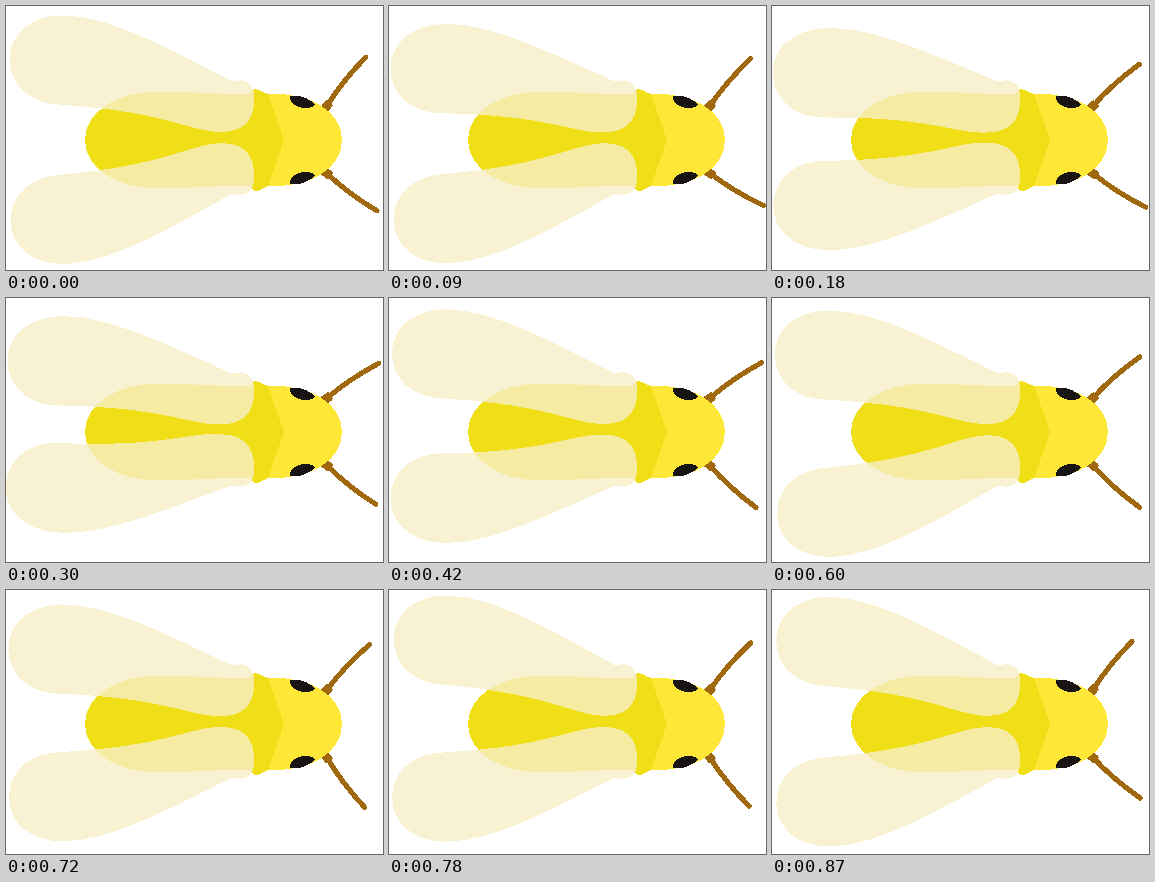
Animation, 377 px wide and 264 px high, one loop 900 ms. Source, as an HTML page:

```html
<!DOCTYPE html>
<html lang="en">
<head>
<meta charset="utf-8">
<title>Fluttering insect</title>
<style>
  html, body { margin: 0; width: 100%; height: 100%; overflow: hidden; background: #fff; }
  svg { display: block; width: 100%; height: 100%; shape-rendering: crispEdges; }
  .dark { fill: #f0de16; }
  .light { fill: #ffe737; }
  .eye { fill: #171413; }
  .wing { fill: #f7efc7; fill-opacity: .79; }
  .stalk { fill: none; stroke: #a0690f; stroke-width: 5.2; stroke-linecap: round; }
  .joint { fill: #a0690f; }
</style>
</head>
<body>
<svg viewBox="0 0 377 264">
  <defs>
    <path id="eye" class="eye" d="M284 90 C291 88 303 92 309 98 C308 102 300 103 293 101 C287 99 283 94 284 90Z"/>
  </defs>
  <g id="feelers"></g>
  <path class="light" d="M255 88 H262 C300 86 336 103 336 134 C336 165 300 182 262 180 H255Z"/>
  <path class="dark" d="M79 134 C79 105 112 85.5 152 85.5 C190 85.5 215 89 248 88 V180 C215 179 190 182.5 152 182.5 C112 182.5 79 163 79 134Z"/>
  <path class="dark" d="M244 88 L247 84 Q250 82 255 85 L262 88 L278 134 L262 180 L255 183.5 Q250 186.500 247 184 L244 180Z"/>
  <use href="#eye"/>
  <use href="#eye" transform="translate(0 268) scale(1 -1)"/>
  <g id="wings"></g>
</svg>
<script>
  const LOOP = 900, STEP = 30;

  // Upper wing at rest: start point, then cubic segments.
  const WING = [
    [58, 11.5],
    [105, 12], [165, 45], [225, 75],
    [228, 76], [247, 68], [248, 90],
    [249, 108], [243, 126], [216, 126],
    [184, 126.5], [162, 107], [58, 101],
    [24, 101], [3, 82], [3, 55],
    [3, 30], [25, 11], [58, 11.5]
  ];
  const REST = 11.5, PIVOT = [236, 100], AXIS = 263;

  // Eases from one turning point [ms, value] to the next, round the loop.
  function swing(poses, t) {
    const n = poses.length;
    const i = poses.findLastIndex(p => p[0] <= t);
    const [t0, a] = poses[(i + n) % n], [t1, b] = poses[(i + 1) % n];
    const wrap = x => (x + LOOP) % LOOP;
    const u = wrap(t - t0) / wrap(t1 - t0);
    return a + (b - a) * (1 - Math.cos(Math.PI * u)) / 2;
  }

  function add(parent, tag) {
    const el = document.createElementNS("http://www.w3.org/2000/svg", tag);
    return document.getElementById(parent).appendChild(el);
  }

  // The wing bends about its root; the root itself stays put.
  function wingPath(height, flip) {
    const turn = (REST - height) / (PIVOT[0] - WING[0][0]);
    const pts = WING.map(([x, y]) => {
      const bend = turn * Math.min(1, Math.max(0, (235 - x) / 65));
      const c = Math.cos(bend), s = Math.sin(bend);
      const dx = x - PIVOT[0], dy = y - PIVOT[1];
      const px = PIVOT[0] + dx * c - dy * s;
      const py = PIVOT[1] + dx * s + dy * c;
      return `${px.toFixed(2)} ${(flip ? AXIS - py : py).toFixed(2)}`;
    });
    return `M${pts[0]}C${pts.slice(1).join(" ")}Z`;
  }

  function makeWing(poses, flip) {
    const el = add("wings", "path");
    el.setAttribute("class", "wing");
    return t => el.setAttribute("d", wingPath(swing(poses, t), flip));
  }

  function makeFeeler(poses, y, side) {
    const g = add("feelers", "g");
    g.innerHTML = `<path class="stalk" d="M0 0 Q30 ${3.5 * side} 63 0"/>
      <rect class="joint" x="-5" y="-4.5" width="10.5" height="9" rx="2"/>`;
    return t => g.setAttribute("transform",
      `translate(320.5 ${y}) rotate(${side * swing(poses, t)})`);
  }

  const parts = [
    makeFeeler([[20, 51.5], [330, 33.5]], 100.5, -1),
    makeFeeler([[90, 31], [440, 42.5], [600, 42], [730, 53]], 167, 1),
    makeWing([[180, 22], [500, 9.5], [700, 15.5], [800, 4.5]], false),
    makeWing([[50, 4], [280, 28.5], [590, 4], [740, 12]], true)
  ];

  const start = performance.now();
  function tick() {
    const now = (performance.now() - start) % LOOP;
    const t = Math.floor(now / STEP) * STEP;
    parts.forEach(pose => pose(t));
    requestAnimationFrame(tick);
  }
  tick();
</script>
</body>
</html>
```
